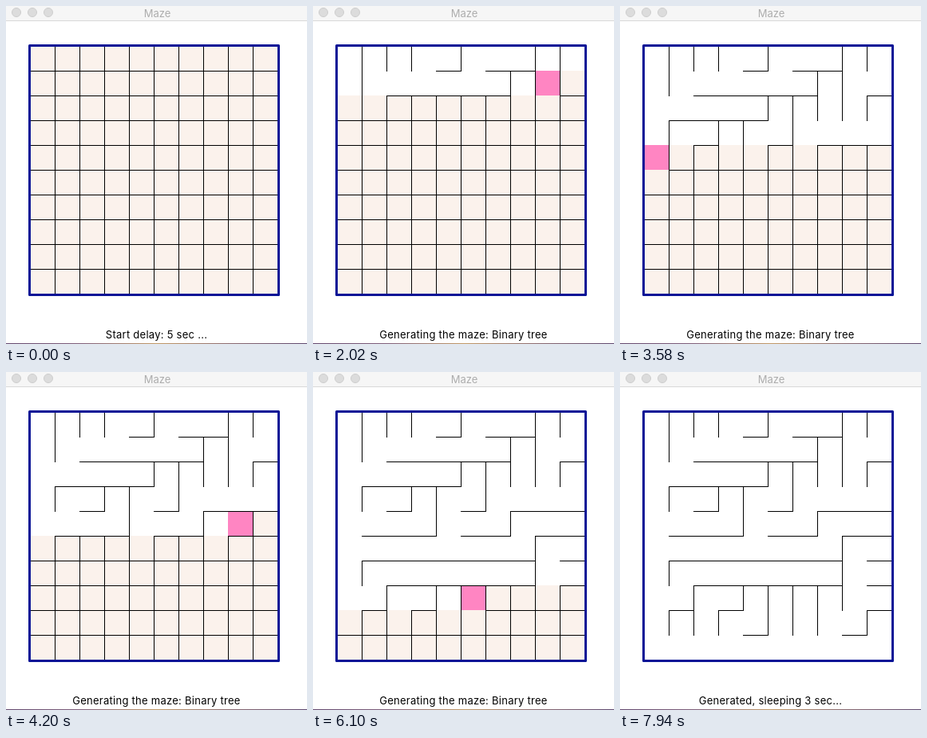
These frames come from a looping animation (377x423 px, 8 s). An HTML page with a canvas:

```html
<!DOCTYPE html>
<html lang="en">
<head>
<meta charset="utf-8">
<title>Maze</title>
<style>
  html, body { margin: 0; width: 100%; height: 100%; overflow: hidden; background: #fff; }
  canvas { position: absolute; left: 0; top: 0; }
  div { position: absolute; left: 0; width: 377px; text-align: center; white-space: pre;
        font: 13px/18px Inter, sans-serif; }
  #title { top: 0; left: 1px; color: #adadad; }
  #status { top: 402px; color: #000; letter-spacing: .26px; }
</style>
</head>
<body>
<canvas id="stage" width="377" height="423"></canvas>
<div id="title">Maze</div>
<div id="status"></div>
<script>
const ctx = document.getElementById('stage').getContext('2d');
const status = document.getElementById('status');

const LOOP = 8000, START = 714, STEP = 86.87, CELLS_PER_STEP = 1.21;
const SIZE = 10, CELL = 31, LEFT = 30, TOP = 50;

// Columns in each row that open to the south; every other cell opens to the west.
const southLinks = ['0123589', '0178', '056789', '01346', '047',
                    '08', '018', '0245678', '01235679', ''];

function rect(color, x, y, w, h) {
  ctx.fillStyle = color;
  ctx.fillRect(x, y, w, h);
}

function drawWindow() {
  rect('#fff', 0, 0, 377, 423);
  rect('#f6f6f6', 0, 0, 377, 18);
  rect('#d9d9d9', 0, 18, 377, 1);
  for (const x of [13, 33, 53]) {
    ctx.beginPath();
    ctx.arc(x, 8, 5.5, 0, 2 * Math.PI);
    ctx.fillStyle = '#dcdcdc';
    ctx.fill();
    ctx.strokeStyle = '#cecece';
    ctx.lineWidth = 1;
    ctx.stroke();
  }
  const desktop = ctx.createLinearGradient(0, 0, 377, 0);
  ['#63486f', '#80607c', '#c29a68', '#8a6a72', '#5d4870']
    .forEach((color, i) => desktop.addColorStop(i / 4, color));
  rect(desktop, 0, 422, 377, 1);
}

function drawMaze(current) {
  const cells = Array.from({ length: SIZE * SIZE }, (_, i) => {
    const row = Math.floor(i / SIZE), col = i % SIZE;
    return { i, row, col, x: LEFT + col * CELL, y: TOP + row * CELL,
             south: southLinks[row].includes(col), visited: i <= current };
  });
  for (const { i, x, y, visited } of cells) {
    const color = i === current ? '#ff85c2' : visited ? '#fff' : '#fbf2ec';
    rect(color, x, y, CELL + 1, CELL + 1);
  }
  for (const { row, col, x, y, south, visited } of cells) {
    if (row < SIZE - 1 && !(visited && south)) rect('#000', x, y + CELL, CELL + 1, 1);
    if (col > 0 && !(visited && !south)) rect('#000', x, y, 1, CELL + 1);
  }
  ctx.strokeStyle = '#0a1496';
  ctx.lineWidth = 3;
  ctx.lineJoin = 'round';
  ctx.strokeRect(LEFT - .5, TOP - .5, SIZE * CELL + 2, SIZE * CELL + 2);
}

function render(now) {
  const step = Math.floor((now % LOOP - START) / STEP);
  const current = step < 0 ? -1 : Math.floor(.2 + CELLS_PER_STEP * step);
  drawWindow();
  drawMaze(current);
  status.textContent = current < 0 ? 'Start delay: 5 sec ...'
    : current < SIZE * SIZE ? 'Generating the maze: Binary tree'
    : 'Generated, sleeping 3 sec...';
}

const begin = performance.now();
function tick() {
  render(performance.now() - begin);
  requestAnimationFrame(tick);
}
tick();
</script>
</body>
</html>
```
